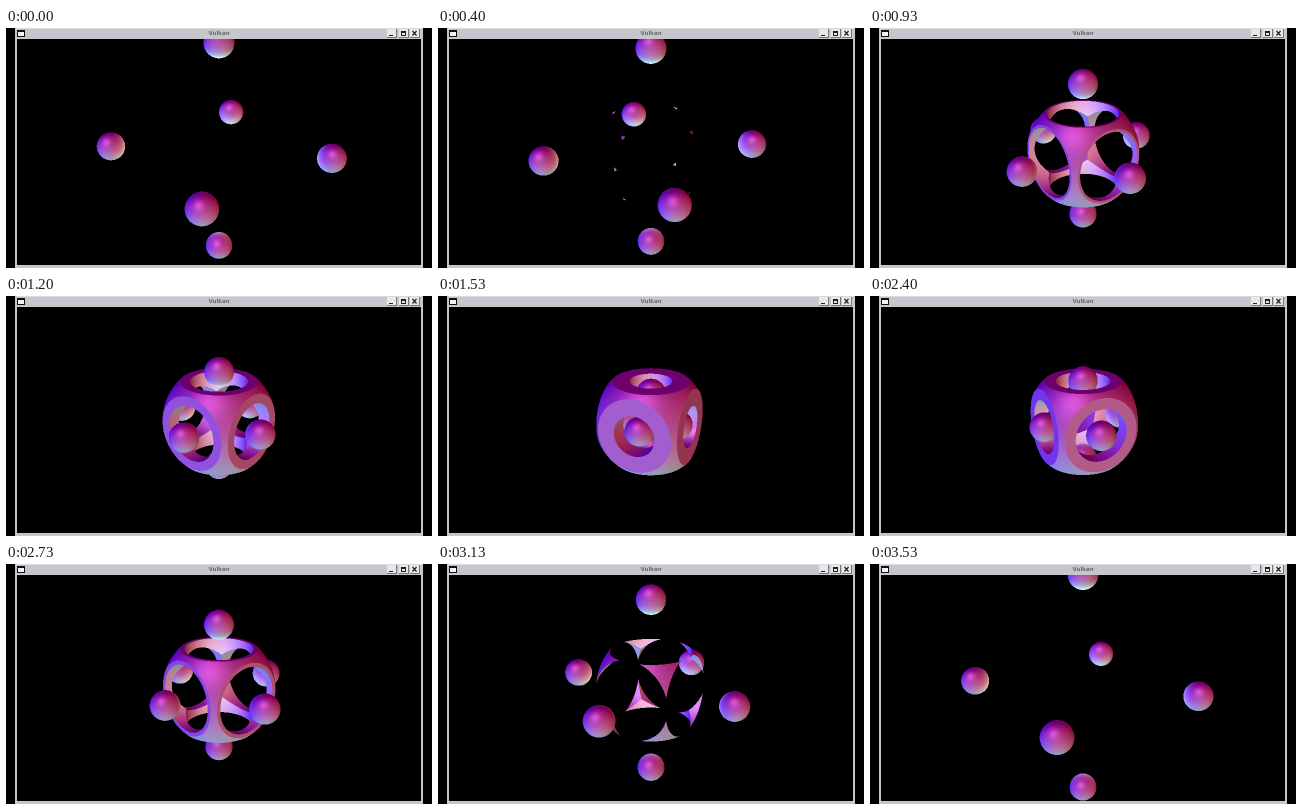
Write an HTML page with a canvas that moves like this. It is 426 px wide and 240 px high and loops after 3.59 s.

```html
<!DOCTYPE html>
<html>
<head>
<meta charset="utf-8">
<style>
html, body { margin: 0; width: 100%; height: 100%; overflow: hidden; background: #000; }
canvas { display: block; width: 426px; height: 240px; }
</style>
</head>
<body>
<canvas id="stage" width="426" height="240"></canvas>
<script>
const LOOP = 3590, FPS = 15;
const VIEW = { x: 11, y: 11, w: 404, h: 226 };
const CX = 213, CY = 124.2, DIST = 582;      // camera distance equals focal length
const SHELL = 56.2, CUBE = 41.8, BALL = 14.3, SS = 2;

// time, yaw, pitch, ball distance, hole radius
const KEYS = [
  [0, -7.3, 25.2, 111.3, 47],
  [400, 10.8, 25.1, 106, 45.1],
  [930, 37, 24.7, 71.5, 35],
  [1530, 67, 24.1, 29, 20.9],
  [2000, 95.5, 23.5, 18, 19.4],
  [2730, 129.9, 22.4, 65.5, 33.6],
  [3530, 169.2, 21.3, 113.5, 47]
];

const stage = document.getElementById('stage').getContext('2d');
const buffer = document.createElement('canvas');
buffer.width = VIEW.w * SS;
buffer.height = VIEW.h * SS;
const bufferCtx = buffer.getContext('2d');
const image = bufferCtx.createImageData(buffer.width, buffer.height);
const pixels = image.data;

function slope(i, col) {
  const a = KEYS[Math.max(0, i - 1)], b = KEYS[Math.min(KEYS.length - 1, i + 1)];
  return (b[col] - a[col]) / (b[0] - a[0]);
}

function sample(t, col) {
  let i = 0;
  while (i < KEYS.length - 2 && t >= KEYS[i + 1][0]) i++;
  const a = KEYS[i], b = KEYS[i + 1], span = b[0] - a[0];
  const u = Math.min(1, (t - a[0]) / span), v = 1 - u;
  return a[col] * v * v * (1 + 2 * u) + b[col] * u * u * (3 - 2 * u)
    + span * u * v * (v * slope(i, col) - u * slope(i + 1, col));
}

const dot = (a, b) => a[0] * b[0] + a[1] * b[1] + a[2] * b[2];
const clamp01 = v => v < 0 ? 0 : v > 1 ? 1 : v;

const holeIn = [0, 0, 0], holeOut = [0, 0, 0];
const hit = [0, 0, 0], normal = [0, 0, 0], dir = [0, 0, 0];

// First surface of (sphere ∩ cube) − three axial cylinders; fills normal.
function hitShell(o, d, a, od, oo, hole) {
  const disc = od * od - a * (oo - SHELL * SHELL);
  if (disc <= 0) return Infinity;
  const root = Math.sqrt(disc);
  let enter = (-od - root) / a, exit = (-od + root) / a, face = -1, bore = -1;
  for (let i = 0; i < 3; i++) {
    const side = d[i] > 0 ? 1 : -1;
    const near = (-side * CUBE - o[i]) / d[i], far = (side * CUBE - o[i]) / d[i];
    if (near > enter) { enter = near; face = i; }
    if (far < exit) exit = far;
    const qa = a - d[i] * d[i], qb = od - o[i] * d[i];
    const q = qb * qb - qa * (oo - o[i] * o[i] - hole * hole);
    holeIn[i] = q > 0 ? (-qb - Math.sqrt(q)) / qa : Infinity;
    holeOut[i] = q > 0 ? (-qb + Math.sqrt(q)) / qa : -Infinity;
  }
  let t = enter;
  for (let moved = true; moved && t < exit;) {
    moved = false;
    for (let i = 0; i < 3; i++) {
      if (holeIn[i] <= t && t < holeOut[i] - 1e-9) {
        t = holeOut[i];
        bore = i;
        moved = true;
      }
    }
  }
  if (t >= exit) return Infinity;
  for (let i = 0; i < 3; i++) {
    const p = o[i] + d[i] * t;
    if (bore >= 0) normal[i] = i === bore ? 0 : -p / hole;
    else if (face >= 0) normal[i] = i === face ? -Math.sign(d[i]) : 0;
    else normal[i] = p / SHELL;
  }
  return t;
}

// Coloured side lights, a soft highlight and a pale glow from the centre.
function shade(k, axes, onBall) {
  const x = dot(normal, axes[0]), y = dot(normal, axes[1]), z = dot(normal, axes[2]);
  const inward = Math.max(0, -dot(hit, normal) / Math.sqrt(dot(hit, hit)));
  const core = Math.pow(inward, 1.2) * (onBall ? 1 - z : z * z);
  const gloss = Math.pow(Math.max(0, -0.16 * x + 0.3 * y + 0.94 * z), 24) * 0.24;
  const below = Math.max(0, -y) ** 2;
  const r = clamp01(0.39 + 0.08 * x - 0.09 * y + 0.29 * z);
  const g = clamp01(0.1 - 0.243 * y + 0.164 * z + 0.25 * below);
  const b = clamp01(0.565 - 0.335 * x - 0.176 * y + 0.057 * z);
  pixels[k] = 255 * (r + gloss + 0.4 * core);
  pixels[k + 1] = 255 * (g + gloss * 0.6 + 0.58 * core);
  pixels[k + 2] = 255 * (b + gloss + 0.4 * core);
}

function renderScene(t) {
  const yaw = sample(t, 1) * Math.PI / 180, pitch = sample(t, 2) * Math.PI / 180;
  const spread = sample(t, 3), hole = sample(t, 4);
  const s = Math.sin(yaw), c = Math.cos(yaw), sp = Math.sin(pitch), cp = Math.cos(pitch);
  const axes = [[c, 0, s], [sp * s, cp, -sp * c], [-cp * s, sp, cp * c]];
  const eye = axes[2].map(v => v * DIST);
  const oo = DIST * DIST, od = -oo;
  let k = 0;
  for (let j = 0; j < buffer.height; j++) {
    const vy = CY - (VIEW.y + (j + 0.5) / SS);
    for (let i = 0; i < buffer.width; i++, k += 4) {
      const vx = VIEW.x + (i + 0.5) / SS - CX;
      for (let n = 0; n < 3; n++) dir[n] = vx * axes[0][n] + vy * axes[1][n] - eye[n];
      const a = vx * vx + vy * vy + oo;
      let best = hitShell(eye, dir, a, od, oo, hole), ballAxis = -1, ballPos = 0;
      for (let n = 0; n < 6; n++) {
        const axis = n >> 1, pos = n & 1 ? spread : -spread;
        const b = od - pos * dir[axis];
        const disc = b * b - a * (oo - 2 * pos * eye[axis] + spread * spread - BALL * BALL);
        if (disc <= 0) continue;
        const near = (-b - Math.sqrt(disc)) / a;
        if (near < best) { best = near; ballAxis = axis; ballPos = pos; }
      }
      pixels[k + 3] = 255;
      if (best === Infinity) {
        pixels[k] = pixels[k + 1] = pixels[k + 2] = 0;
        continue;
      }
      for (let n = 0; n < 3; n++) {
        hit[n] = eye[n] + dir[n] * best;
        if (ballAxis >= 0) normal[n] = (hit[n] - (n === ballAxis ? ballPos : 0)) / BALL;
      }
      shade(k, axes, ballAxis >= 0);
    }
  }
  bufferCtx.putImageData(image, 0, 0);
}

function box(color, x, y, w, h) {
  stage.fillStyle = color;
  stage.fillRect(x, y, w, h);
}

function drawWindow() {
  box('#000', 0, 0, 426, 240);
  box('#c6c7cc', 9, 0, 408, 240);
  box('#dadade', 10, 0, 406, 1);
  box('#111', 11, 2, 8, 7);
  box('#f4f4f4', 12, 4, 6, 4);
  for (const x of [381, 393, 404]) {
    box('#77777a', x, 1, 10, 9);
    box('#e8e8e8', x, 1, 9, 8);
  }
  box('#222', 383, 7, 4, 1);
  box('#222', 395, 3, 5, 5);
  box('#e8e8e8', 396, 5, 3, 2);
  stage.strokeStyle = '#222';
  stage.lineWidth = 1.2;
  stage.beginPath();
  stage.moveTo(406.5, 3);
  stage.lineTo(410.5, 7.5);
  stage.moveTo(410.5, 3);
  stage.lineTo(406.5, 7.5);
  stage.stroke();
  stage.fillStyle = '#6a6a70';
  stage.font = 'bold 5.5px "DejaVu Sans", sans-serif';
  stage.textAlign = 'center';
  stage.textBaseline = 'alphabetic';
  stage.fillText('Vulkan', 213, 7.3);
}

let shown = -1;
function tick() {
  const step = Math.min(53, Math.floor((performance.now() % LOOP + 4) * FPS / 1000));
  if (step !== shown) {
    shown = step;
    renderScene(step * 1000 / FPS);
    drawWindow();
    stage.imageSmoothingEnabled = true;
    stage.drawImage(buffer, VIEW.x, VIEW.y, VIEW.w, VIEW.h);
  }
  requestAnimationFrame(tick);
}
tick();
</script>
</body>
</html>
```
